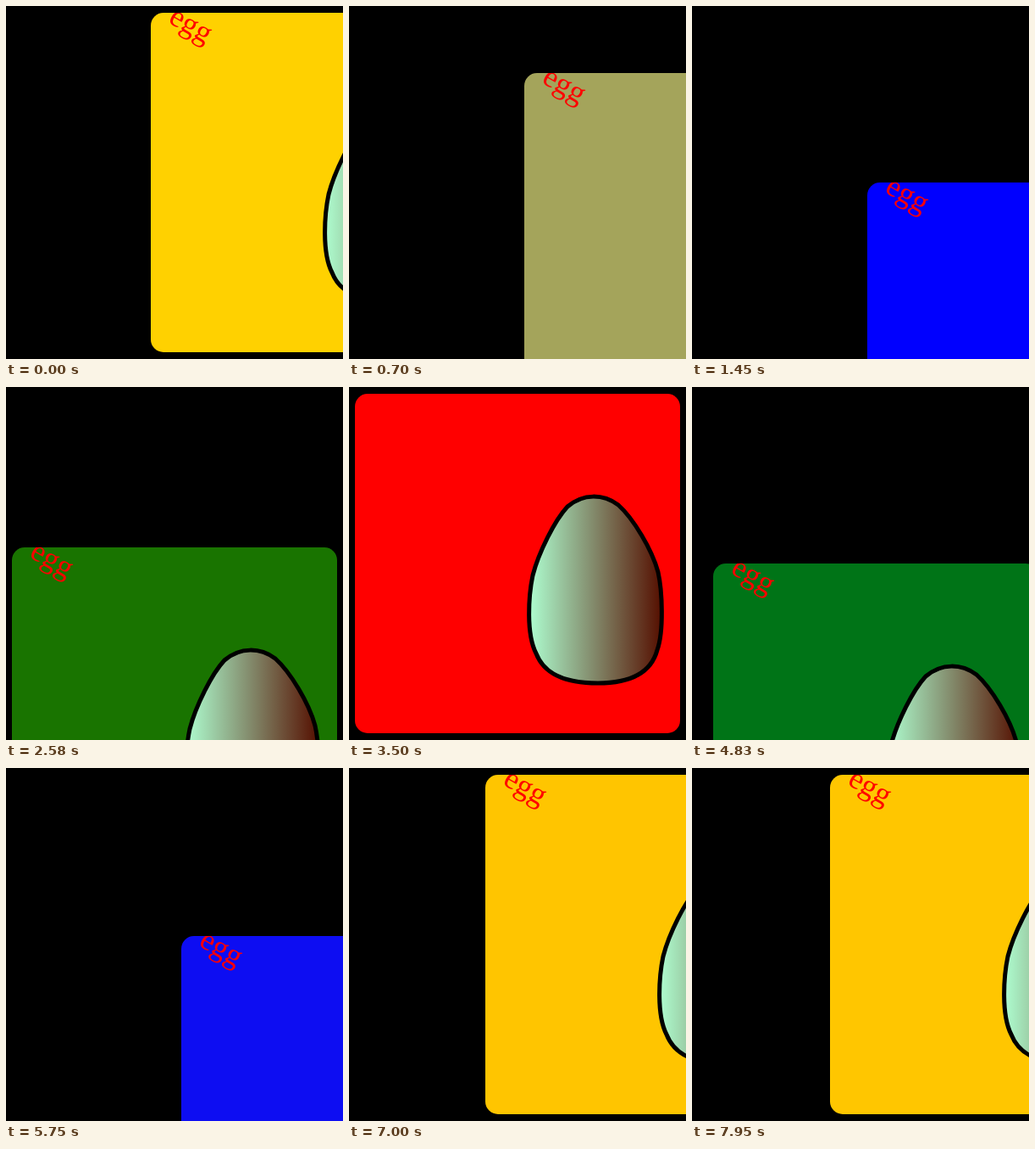
Recreate the animation shown at these times as an HTML page. Size 398 px wide and 416 px high, loop 8 s.

```html
<!DOCTYPE html>
<html lang="en">
<head>
<meta charset="utf-8">
<title>Egg card</title>
<style>
  html, body { margin: 0; width: 100%; height: 100%; overflow: hidden; background: #000; }
  svg { display: block; width: 398px; height: 416px; }
  text { font: 36px "Liberation Serif", "Times New Roman", serif; fill: red; }
</style>
</head>
<body>
<svg viewBox="0 0 398 416">
  <defs>
    <linearGradient id="shell">
      <stop offset="0" stop-color="rgb(174,254,208)"/>
      <stop offset="1" stop-color="rgb(85,15,0)"/>
    </linearGradient>
    <clipPath id="edge"><rect width="384" height="400"/></clipPath>
  </defs>
  <g id="card">
    <rect id="back" width="384" height="400" rx="15"/>
    <g clip-path="url(#edge)">
      <text x="5" y="15" transform="rotate(30 20 40)">egg</text>
    </g>
    <path transform="translate(-7 -8)" fill="url(#shell)" stroke="#000" stroke-width="5"
      d="M258 141C277 125 300 126 318 139C336 155 358 192 365 218C370 240 372 288 364 310
         C358 332 340 349 294 349C245 349 228 332 221 314C209 291 212 246 217 222C224 195 243 157 258 141Z"/>
  </g>
</svg>
<script>
const LOOP = 8000, HALF = 4000, SEGMENT = 1000, STEP = 1000 / 24;
const card = document.getElementById('card');
const back = document.getElementById('back');

const stops = [
  { pos: [0, 0],     rgb: [255, 0, 0] },
  { pos: [200, 0],   rgb: [255, 255, 0] },
  { pos: [200, 200], rgb: [0, 0, 255] },
  { pos: [0, 200],   rgb: [0, 128, 0] },
  { pos: [0, 0],     rgb: [255, 0, 0] }
];

// CSS "ease": cubic-bezier(.25, .1, .25, 1)
const bezier = (s, a, b) => 3 * (1 - s) ** 2 * s * a + 3 * (1 - s) * s * s * b + s ** 3;
function ease(x) {
  let lo = 0, hi = 1;
  for (let i = 0; i < 24; i++) {
    const mid = (lo + hi) / 2;
    if (bezier(mid, .25, .25) < x) lo = mid; else hi = mid;
  }
  return bezier((lo + hi) / 2, .1, 1);
}

const mix = (a, b, k) => a.map((v, i) => Math.round(v + (b[i] - v) * k));

// 24 pictures a second, each starting on a 10 ms tick
const hold = t => Math.floor((Math.floor(t / 10) * 10 + 8.4) / STEP) * STEP;

function draw(t) {
  // runs forwards round the square, then back the same way
  const u = (hold(t) + 524) % LOOP;
  const time = Math.max(0, HALF - 6 - Math.abs(HALF - u));
  const i = Math.min(3, Math.floor(time / SEGMENT));
  const k = ease(time / SEGMENT - i);
  const [from, to] = [stops[i], stops[i + 1]];
  const [x, y] = mix(from.pos, to.pos, k);
  card.setAttribute('transform', `translate(${7 + x} ${8 + y})`);
  back.setAttribute('fill', `rgb(${mix(from.rgb, to.rgb, k)})`);
}

const start = performance.now();
function tick() {
  draw((performance.now() - start) % LOOP);
  requestAnimationFrame(tick);
}
tick();
</script>
</body>
</html>
```
